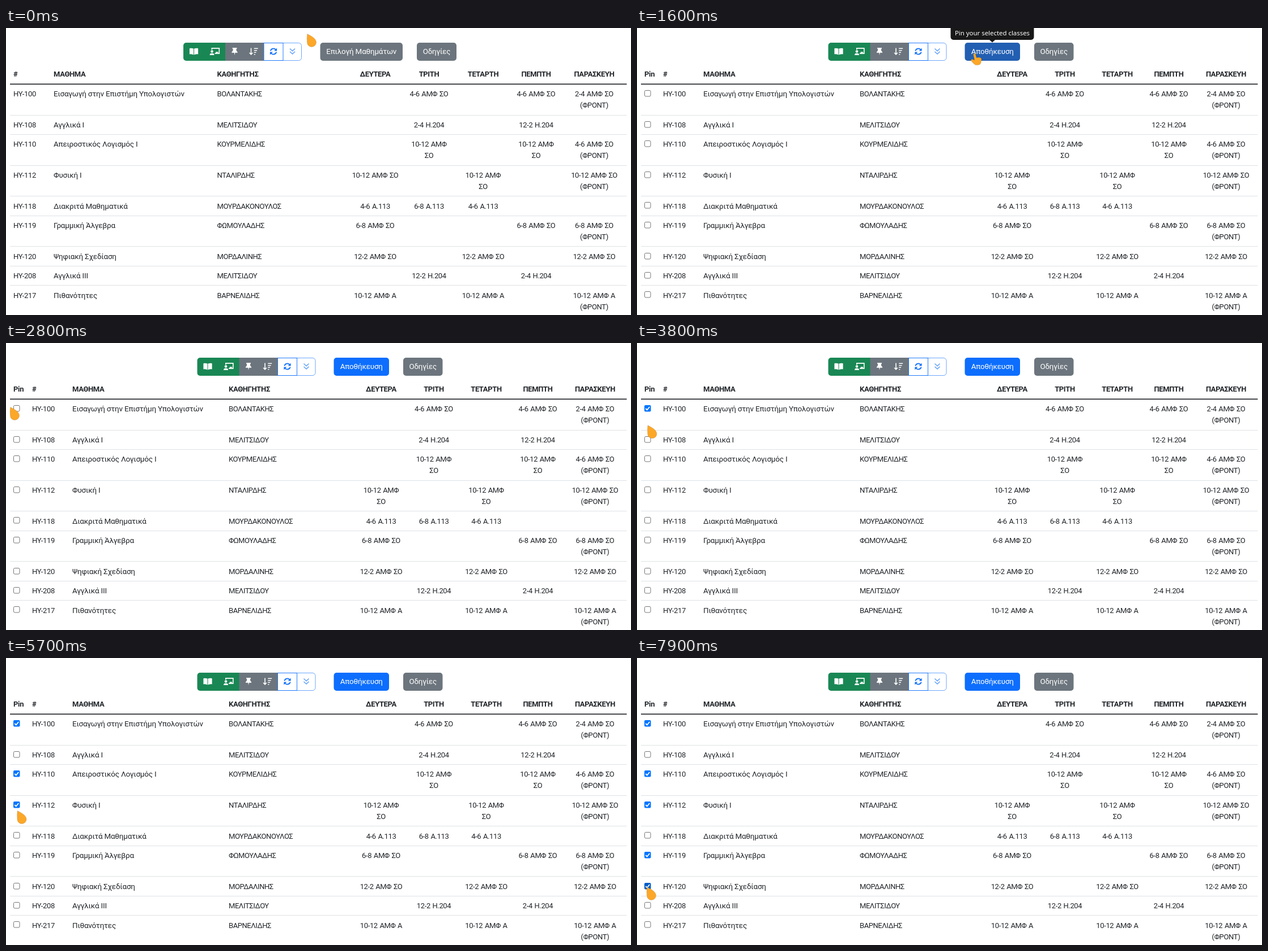
Animation, 1103 px wide and 508 px high, one loop 8 s. Source, as an HTML page:

```html
<!DOCTYPE html>
<html lang="el">
<head>
<meta charset="utf-8">
<title>Timetable</title>
<style>
html, body { margin: 0; width: 100%; height: 100%; overflow: hidden; background: #fff; }
svg { display: block; width: 100%; height: 100%; }
text { font: 13.4px Roboto, "Noto Sans", sans-serif; letter-spacing: -.17px; fill: #212529; }
.head { font-size: 13px; font-weight: 700; letter-spacing: -.35px; }
.caps { font-size: 13px; letter-spacing: -.45px; }
.slot { font-size: 13px; letter-spacing: -.38px; word-spacing: .8px; }
.mid { text-anchor: middle; }
.btn { fill: #fff; }
.tip { font: 11.4px "Noto Sans", sans-serif; letter-spacing: 0; fill: #fff; }
</style>
</head>
<body>
<svg id="stage" viewBox="0 0 1103 508"></svg>
<script>
const stage = document.getElementById('stage');
const GREEN = '#198754', GREY = '#6c757d', BLUE = '#0d6efd';
const LINE = 20.2;

// code, course, teacher, Monday to Friday; "|" breaks a line, "/" only in the narrow layout
const rows = [
  ['100', 'Εισαγωγή στην Επιστήμη Υπολογιστών', 'ΒΟΛΑΝΤΑΚΗΣ', ['', '4-6 ΑΜΦ ΣΟ', '', '4-6 ΑΜΦ ΣΟ', '2-4 ΑΜΦ ΣΟ|(ΦΡΟΝΤ)']],
  ['108', 'Αγγλικά Ι', 'ΜΕΛΙΤΣΙΔΟΥ', ['', '2-4 Η.204', '', '12-2 Η.204', '']],
  ['110', 'Απειροστικός Λογισμός Ι', 'ΚΟΥΡΜΕΛΙΔΗΣ', ['', '10-12 ΑΜΦ|ΣΟ', '', '10-12 ΑΜΦ|ΣΟ', '4-6 ΑΜΦ ΣΟ|(ΦΡΟΝΤ)']],
  ['112', 'Φυσική Ι', 'ΝΤΑΛΙΡΔΗΣ', ['10-12 ΑΜΦ/ΣΟ', '', '10-12 ΑΜΦ|ΣΟ', '', '10-12 ΑΜΦ ΣΟ|(ΦΡΟΝΤ)']],
  ['118', 'Διακριτά Μαθηματικά', 'ΜΟΥΡΔΑΚΟΝΟΥΛΟΣ', ['4-6 Α.113', '6-8 Α.113', '4-6 Α.113', '', '']],
  ['119', 'Γραμμική Άλγεβρα', 'ΦΩΜΟΥΛΑΔΗΣ', ['6-8 ΑΜΦ ΣΟ', '', '', '6-8 ΑΜΦ ΣΟ', '6-8 ΑΜΦ ΣΟ|(ΦΡΟΝΤ)']],
  ['120', 'Ψηφιακή Σχεδίαση', 'ΜΟΡΔΑΛΙΝΗΣ', ['12-2 ΑΜΦ ΣΟ', '', '12-2 ΑΜΦ ΣΟ', '', '12-2 ΑΜΦ ΣΟ']],
  ['208', 'Αγγλικά ΙΙΙ', 'ΜΕΛΙΤΣΙΔΟΥ', ['', '12-2 Η.204', '', '2-4 Η.204', '']],
  ['217', 'Πιθανότητες', 'ΒΑΡΝΕΛΙΔΗΣ', ['10-12 ΑΜΦ Α', '', '10-12 ΑΜΦ Α', '', '10-12 ΑΜΦ Α|(ΦΡΟΝΤ)']]
];
const days = ['ΔΕΥΤΕΡΑ', 'ΤΡΙΤΗ', 'ΤΕΤΑΡΤΗ', 'ΠΕΜΠΤΗ', 'ΠΑΡΑΣΚΕΥΗ'];
const layouts = {
  view: { cols: [13, 84, 372.5], days: [651.5, 746.5, 842, 935.5, 1038] },
  pick: { cols: [46, 117, 393], days: [662, 755, 847.5, 938.5, 1039.5] }
};
const checkTimes = { 0: 3400, 2: 4400, 3: 5400, 5: 6600, 6: 7500 };

// pointer tip: time, x, y
const track = [
  [200, 531, 10], [400, 546, 18], [800, 585, 39], [1000, 596, 45], [1800, 596, 45],
  [1900, 583, 46], [2000, 515, 51], [2100, 443, 55], [2300, 270, 80], [2500, 90, 105],
  [2700, 13, 112], [2800, 7, 113], [3000, 17, 116], [3600, 17, 116], [4200, 21, 204],
  [4600, 21, 204], [4700, 17, 214], [5200, 18, 260], [5600, 18, 260], [6000, 24, 300],
  [6400, 18, 348], [6700, 18, 348], [6800, 17, 352], [7400, 18, 402], [7500, 17, 403], [7900, 17, 405]
];

function pointerAt(t) {
  if (t <= track[0][0]) return track[0].slice(1);
  const i = track.findIndex(k => k[0] >= t);
  const [t0, x0, y0] = track[i - 1], [t1, x1, y1] = track[i];
  const p = (t - t0) / (t1 - t0);
  return [x0 + (x1 - x0) * p, y0 + (y1 - y0) * p];
}

const text = (x, y, s, cls = '') => `<text x="${x}" y="${y}" class="${cls}">${s}</text>`;
const rect = (x, y, w, h, fill, more = '') =>
  `<rect x="${x}" y="${y}" width="${w}" height="${h}" fill="${fill}" ${more}/>`;
const fillPath = (d, color) => `<path d="${d}" fill="${color}"/>`;
const strokePath = (d, color, w = 1.7) =>
  `<path d="${d}" fill="none" stroke="${color}" stroke-width="${w}"/>`;
const at = (x, y, s) => `<g transform="translate(${x} ${y})">${s}</g>`;

const icons = {
  book: fillPath('M-7.6-5.2C-5.5-6-2.7-5.8-.5-4.9V6C-2.7 5-5.5 4.6-7.6 5ZM7.6-5.2C5.5-6 2.7-5.8.5-4.9V6C2.7 5 5.5 4.6 7.6 5Z', '#fff'),
  board: strokePath('M-5.2-3V-5.6H7.8V3.6H0M2.5 3V1.6H6', '#fff', 1.6) +
    '<circle cx="-5" cy="0" r="2.3" fill="#fff"/>' +
    fillPath('M-9 6.5Q-8.8 3.2-6 3.2H-4Q-1.2 3.2-1 6.5Z', '#fff'),
  pin: fillPath('M-4-6.5H4V-4.8H2.8L3.2-1Q5.3.3 5.3 2.3H.8L0 6.6-.8 2.3H-5.3Q-5.3.3-3.2-1L-2.8-4.8H-4Z', '#fff'),
  sort: strokePath('M-4.5-6V5.5M-7.4 2.3-4.5 5.3-1.6 2.3M.8-5.3H7.6M.8-1.8H6M.8 1.7H4.4M.8 5.2H2.8', '#fff', 1.6),
  sync: strokePath('M-5.2-1A5.3 5.3 0 0 1 4-3.2M5.2 1A5.3 5.3 0 0 1-4 3.2', BLUE) +
    fillPath('M6.1-6V-1H1.1ZM-6.1 6V1H-1.1Z', BLUE),
  more: strokePath('M-4.5-5 0-.7 4.5-5M-4.5.3 0 4.6 4.5.3', '#5c9dfe', 1.4)
};

function toolbar(x, reloadHover) {
  const round = 'rx="5"';
  return at(x, 26,
    rect(0, 0, 90, 32, GREEN, round) + rect(74, 0, 68, 32, GREY) +
    rect(160, .5, 48.5, 31, '#fff', 'rx="5" stroke="#5c9dfe" stroke-width=".9"') +
    rect(142, .5, 34, 31, reloadHover ? '#dfe9f6' : '#fff', `stroke="${BLUE}" stroke-width=".9"`) +
    [['book', 18.5], ['board', 55.5], ['pin', 90.5], ['sort', 124], ['sync', 159], ['more', 192.5]]
      .map(([name, cx]) => at(cx, 15.5, icons[name])).join(''));
}

const button = (x, w, label, fill) =>
  rect(x, 26, w, 32, fill, 'rx="5"') + text(x + w / 2, 46, label, 'btn mid');

function tooltip(cx, w, label, alpha) {
  if (!alpha) return '';
  return `<g opacity="${alpha}">` + rect(cx - w / 2, -8, w, 29, '#000', 'rx="5"') +
    fillPath(`M${cx - 5} 21H${cx + 5}L${cx} 25.5Z`, '#000') +
    text(cx, 12.7, label, 'tip mid') + '</g>';
}

function checkbox(cy, checked, hover) {
  if (!checked) return rect(13.5, cy - 5.5, 10.5, 10.5, '#fff', `rx="2" stroke="${hover ? '#4f4f4f' : '#767676'}"`);
  return rect(13, cy - 6, 11.5, 11.5, hover ? '#005cc8' : '#0075ff', 'rx="2"') +
    strokePath(`M15.3 ${cy}L17.8 ${cy + 2.5} 22.2 ${cy - 3}`, '#fff', 1.8);
}

function table(picking, t, [px, py]) {
  const { cols, days: centers } = layouts[picking ? 'pick' : 'view'];
  let out = picking ? text(13, 86, 'Pin', 'head') : '';
  ['#', 'ΜΑΘΗΜΑ', 'ΚΑΘΗΓΗΤΗΣ'].forEach((s, i) => out += text(cols[i], 86, s, 'head'));
  days.forEach((s, i) => out += text(centers[i], 86, s, 'head mid'));
  out += rect(7, 98.5, 1088.5, 1.7, '#212529');

  let top = 99.4;
  rows.forEach(([code, course, teacher, slots], r) => {
    const base = top + 21.7, cy = Math.round(top + 16.6);
    out += text(cols[0], base, 'HY-' + code, 'slot') + text(cols[1], base, course) +
      text(cols[2], base, teacher, 'caps');
    slots.forEach((slot, d) => slot.replace('/', picking ? '|' : ' ').split('|')
      .forEach((s, n) => out += text(centers[d], base + n * LINE, s, 'slot mid')));
    if (picking) {
      const hover = px >= 13 && px <= 25 && Math.abs(py - cy) < 6;
      out += checkbox(cy, t >= checkTimes[r], hover);
    }
    top += slots.some(s => /[|/]/.test(s)) ? 54.65 : 34.45;
    if (r < rows.length - 1) out += rect(7, Math.round(top - .5), 1088.5, 1, '#dee2e6');
  });
  return out;
}

function pointer([x, y], hand) {
  const d = hand
    ? 'M-2.6 1.5Q-1-1.5 1.2.7L3.2 7.5 8 7Q12 7.6 12 10.8L11 16Q10 20.6 5 20.6H1.5Q-2 18.5-6.4 13Q-7 10-4.3 10.2L-.4 11.8Z'
    : 'M.6.4C5 2.4 16.6 8 16.6 15.3A8.1 8.1 0 0 1 .4 15.5Q-.2 8 .6.4Z';
  return at(x, y, `<path d="${d}" fill="#fca728" stroke="#000" stroke-opacity=".15" stroke-width=".8"/>`);
}

function saveColor(t) {
  if (t < 1600) return '#45627f';
  if (t < 1700) return '#225fb2';
  return t < 2000 ? '#0b5ed7' : t < 2100 ? '#0c66ea' : BLUE;
}

function pinTipAlpha(t) {
  if (t < 600 || t >= 2200) return 0;
  if (t < 700) return .25;
  if (t < 800) return .7;
  return t < 2100 ? .9 : .22;
}

function draw(t) {
  const picking = t >= 1500, tip = pointerAt(t);
  const onReload = t >= 2000 && t < 2200;
  stage.innerHTML =
    table(picking, t, tip) +
    toolbar(picking ? 337.5 : 313, onReload) +
    (picking
      ? button(578.5, 97.5, 'Αποθήκευση', saveColor(t)) + button(701, 69.5, 'Οδηγίες', GREY)
      : button(554.5, 145.5, 'Επιλογή Μαθημάτων', t >= 600 ? '#5c636a' : GREY) + button(725, 70, 'Οδηγίες', GREY)) +
    tooltip(496.5, 131, 'Reload table contents', onReload ? .14 : 0) +
    tooltip(627, 147, 'Pin your selected classes', pinTipAlpha(t)) +
    pointer(tip, t >= 600 && t < 2200);
}

// the picture advances in tenths of a second
let shown = -1;
function tick() {
  const t = Math.floor(performance.now() % 8000 / 100) * 100;
  if (t !== shown) draw(shown = t);
  requestAnimationFrame(tick);
}
tick();
</script>
</body>
</html>
```
